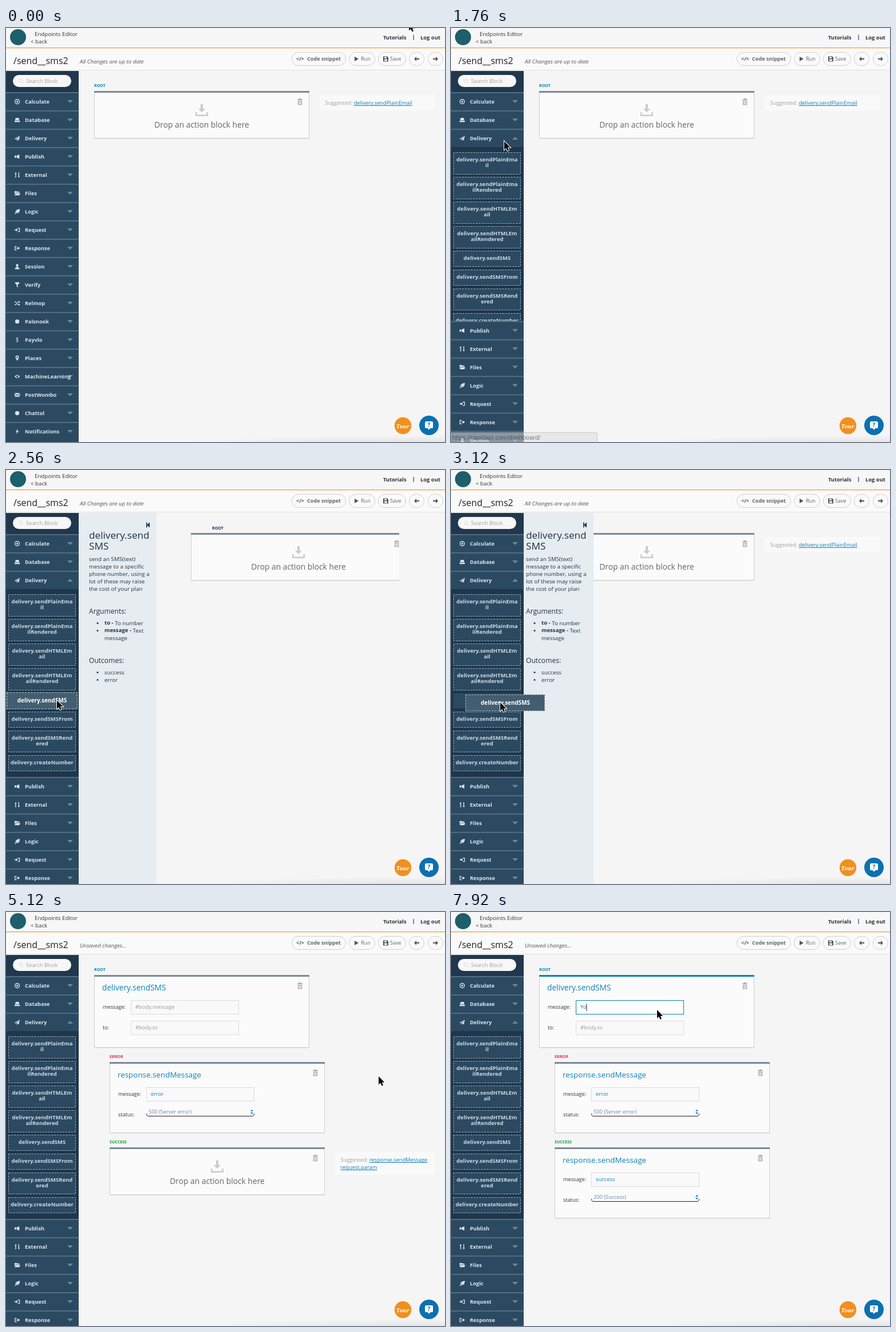
An HTML page with a canvas that plays this animation: 767 by 723 pixels, repeating every 8 s.

```html
<!DOCTYPE html>
<html lang="en">
<head>
<meta charset="utf-8">
<title>Endpoints Editor</title>
<style>
html, body { margin: 0; width: 767px; height: 723px; overflow: hidden; background: #f5f5f5; }
canvas { display: block; }
</style>
</head>
<body>
<canvas id="stage" width="767" height="723"></canvas>
<script>
const ctx = document.getElementById('stage').getContext('2d');
const LOOP = 8000, STEP = 80;
const BLUE = '#0c82b8', NAVY = '#1f3349', GREY = '#7b8996', ICON = '#dbe4ea';
const SANS = '"Open Sans", "Noto Sans", sans-serif';

// Sidebar entries: label and a 10x10 icon path
const MENU = [
  ['Calculate', 'M5 0a5 5 0 010 10a5 5 0 010-10zM5 1.5a3.5 3.5 0 000 7a3.5 3.5 0 000-7zM5 3.3a1.7 1.7 0 010 3.4a1.7 1.7 0 010-3.4z'],
  ['Database', 'M2 1h6l1 4.5H1zM0 6.3h10V9H0z'],
  ['Delivery', 'M10 0L0 6l2.5 1zM10 0L4 7.3V10l1.5-2L8 9z'],
  ['Publish', 'M0 3h3v4H0zM4 3l5-2v8L4 7z'],
  ['External', 'M2 0L0 3h1.3v7h1.4V3H4zM8 10L6 7h1.3V0h1.4v7H10z'],
  ['Files', 'M0 1h4l1 1h4v2H2L0 8zM2.5 5H11L9 9H0z'],
  ['Logic', 'M10 0Q10 9 3 8L1 10 0 9 2 7Q0 2 10 0zM7 3L3 6.5l.6.5z'],
  ['Request', 'M0 4h3V2l3.5 3L3 8V6H0zM6 1h4v8H6V7.6h2.6V2.4H6z'],
  ['Response', 'M4 1H0v8h4V7.6H1.4V2.4H4zM3.5 4h3V2L10 5 6.5 8V6h-3z'],
  ['Session', 'M5 0a2.3 2.8 0 010 5.6a2.3 2.8 0 010-5.6zM.5 10q0-3 3-4h3q3 1 3 4z'],
  ['Verify', 'M1 0h8v2L6 5v5L4 8.5V5L1 2z'],
  ['Relmop', 'M0 2h2.5l4 5H8V5.5l2.5 2.2L8 9.8V8.3H6L2 3.3H0zM0 7h2l1.2-1.2.8 1L2.5 8.3H0zM5 3.2L6 2h2V.5l2.5 2.2L8 4.8V3.3H6.5l-.7.8z'],
  ['Palsnook', 'M5 1a4 4 0 010 8a4 4 0 010-8z'],
  ['Payvlo', '$'],
  ['Places', 'M5 0a3.3 3.3 0 013.3 3.3Q8.3 5 5 10 1.7 5 1.7 3.3A3.3 3.3 0 015 0zM5 1.8a1.5 1.5 0 000 3a1.5 1.5 0 000-3z'],
  ['MachineLearning', 'M0 5Q5-1 10 5 5 11 0 5zM5 3a2 2 0 000 4a2 2 0 000-4z'],
  ['PostWombo', 'M0 1.5h10L5 5.5zM0 2.8L3 5 0 8zM10 2.8L7 5l3 3zM0 8.7l3.5-3L5 6.8l1.5-1.1 3.5 3z'],
  ['Chattol', 'M5 1a4 4 0 010 8a4 4 0 010-8z'],
  ['Notifications', 'M6 0L2 6h2.5l-1 4L8 4H5.5z']
];

// Delivery blocks: top, height, text lines
const BLOCKS = [
  [217, 39, 'delivery.sendPlainEma', 'il'],
  [260, 39, 'delivery.sendPlainEma', 'ilRendered'],
  [303, 39, 'delivery.sendHTMLEm', 'ail'],
  [346, 39, 'delivery.sendHTMLEm', 'ailRendered'],
  [389, 28, 'delivery.sendSMS'],
  [422, 28, 'delivery.sendSMSFrom'],
  [455, 38, 'delivery.sendSMSRend', 'ered'],
  [498, 28, 'delivery.createNumber']
];
const SMS = 4;

const HTML_INFO = {
  title: ['delivery.send', 'HTMLEmailR', 'endered'],
  body: ['(depreciated): use', 'sendHTMLEmail', 'instead'],
  args: [['from', 'From', 'address'], ['to', 'To address'], ['subject', 'Email', 'subject'],
    ['text', 'Email plain', 'text template'], ['html', 'Email html', 'template'],
    ['view', 'View for', 'rendering email', 'templates']],
  outcomes: [['', 'success']]
};
const SMS_INFO = {
  title: ['delivery.send', 'SMS'],
  body: ['send an SMS(text)', 'message to a specific', 'phone number, using a', 'lot of these may raise', 'the cost of your plan'],
  args: [['to', 'To number'], ['message', 'Text', 'message']],
  outcomes: [['', 'success'], ['', 'error']]
};

// Pointer path: time, x, y
const PATH = [
  [0, 704, -10], [240, 376, 236], [320, 376, 236], [560, 299, 291], [720, 299, 291],
  [1200, 94, 199], [1280, 93, 198], [1840, 93, 198], [2080, 92, 399], [2320, 92, 399],
  [2800, 86, 406], [3120, 86, 406], [3760, 293, 155], [3920, 293, 155], [4080, 597, 162],
  [4240, 597, 162], [4400, 617, 270], [4560, 617, 270], [4880, 651, 287], [5200, 651, 287],
  [5920, 646, 437], [6240, 646, 437], [7040, 360, 171], [8000, 360, 171]
];

const clamp = v => Math.max(0, Math.min(1, v));
const ease = (t, from, to) => { const p = clamp((t - from) / (to - from)); return p * p * (3 - 2 * p); };

function pointerAt(t) {
  const i = Math.max(1, PATH.findIndex(k => k[0] >= t));
  const [t0, x0, y0] = PATH[i - 1], [t1, x1, y1] = PATH[i], p = ease(t, t0, t1);
  return { x: x0 + (x1 - x0) * p, y: y0 + (y1 - y0) * p };
}

// Text is placed by its vertical middle; returns its width
function text(s, x, y, size, color, style = '', align = 'left', family = SANS) {
  ctx.font = `${style} ${size}px ${family}`;
  ctx.textAlign = align;
  ctx.fillStyle = color;
  ctx.fillText(s, x, y + size * 0.36);
  return ctx.measureText(s).width;
}

function rect(x, y, w, h, fill) {
  ctx.fillStyle = fill;
  ctx.fillRect(x, y, w, h);
}

function frame(x, y, w, h, stroke, fill, dash = []) {
  if (fill) rect(x, y, w, h, fill);
  ctx.setLineDash(dash);
  ctx.strokeStyle = stroke;
  ctx.lineWidth = 1;
  ctx.strokeRect(x + 0.5, y + 0.5, w - 1, h - 1);
  ctx.setLineDash([]);
}

function pill(x, y, w, h, fill, stroke) {
  ctx.beginPath();
  ctx.roundRect(x + 0.5, y + 0.5, w - 1, h - 1, h / 2);
  ctx.fillStyle = fill;
  ctx.fill();
  if (stroke) { ctx.strokeStyle = stroke; ctx.lineWidth = 1; ctx.stroke(); }
}

function shape(d, x, y, fill, scale = 1) {
  ctx.save();
  ctx.translate(x, y);
  ctx.scale(scale, scale);
  ctx.fillStyle = fill;
  ctx.fill(new Path2D(d));
  ctx.restore();
}

function disc(x, y, r, fill) {
  ctx.beginPath();
  ctx.arc(x, y, r, 0, 7);
  ctx.fillStyle = fill;
  ctx.fill();
}

function clipped(x, y, w, h, paint) {
  ctx.save();
  ctx.beginPath();
  ctx.rect(x, y, w, h);
  ctx.clip();
  paint();
  ctx.restore();
}

function header(t) {
  rect(0, 0, 767, 34, '#f7f7f7');
  rect(0, 34, 767, 1.5, '#f0a040');
  rect(0, 35.5, 767, 38, '#fafafa');
  rect(0, 73, 767, 1, '#e0e0e0');
  disc(21, 16, 14, '#1d5f6a');
  text('Endpoints Editor', 50, 10.5, 9.7, '#333');
  text('< back', 43, 23.5, 9.7, '#333');
  text('Tutorials', 659, 17, 9.2, '#2a2f3a', 'bold');
  rect(711.5, 12, 1.2, 9, '#27408b');
  text('Log out', 724, 17, 9.4, '#2a2f3a', 'bold');
  text('/send__sms2', 13, 57, 16, '#222');
  text(t < 3920 ? 'All Changes are up to date' : 'Unsaved changes...', 129, 58.5, 9.7, '#555', 'italic');

  for (const [x, w] of [[499, 95], [599, 46], [650, 49], [704, 27], [737, 27]]) pill(x, 42, w, 24, '#fafafa', '#cfcfcf');
  text('</>', 507, 54, 9, '#555', 'bold');
  text('Code snippet', 526, 54, 9.1, '#666', 'bold');
  shape('M0 0L7 4 0 8z', 609, 50, '#555');
  text('Run', 620, 54, 9.1, '#666');
  shape('M0 0h7l2 2v7H0zM2 1v2.5h4V1zM2 8h5V5H2z', 659, 49.5, '#555');
  text('Save', 671, 54, 9.1, '#666');
  shape('M0 4L4 0v3h5v2H4v3z', 713, 50, '#555');
  shape('M9 4L5 0v3H0v2h5v3z', 746, 50, '#555');
}

function block([y, h, ...lines], hot) {
  ctx.save();
  if (hot) {
    ctx.translate(63, y + h / 2);
    ctx.scale(1.05, 1.05);
    ctx.translate(-63, -y - h / 2);
  }
  frame(4, y, 118, h, hot ? '#c3ced6' : '#9fb0bd', hot ? '#435e71' : '#2b4a62', [3, 2]);
  lines.forEach((s, i) => text(s, 63, y + 13 + i * 10, 9.5, hot ? '#fff' : '#cfd9e0', 'bold', 'center'));
  ctx.restore();
}

function sidebar(t, hover) {
  const drop = 328 * ease(t, 1360, 1840), dragging = t >= 3120 && t < 3760;
  rect(0, 75, 127, 648, '#2b4a62');
  rect(0, 75, 127, 38, '#20374d');
  pill(11.5, 81.5, 103, 22, '#f7f7f7');
  ctx.beginPath();
  ctx.arc(26, 92, 3, 0, 7);
  ctx.moveTo(28, 94.5);
  ctx.lineTo(30.5, 97);
  ctx.lineWidth = 1;
  ctx.strokeStyle = '#ddd';
  ctx.stroke();
  text('Search Block', 35, 93, 9.4, '#a2a2a2');

  MENU.forEach(([label, icon], i) => {
    const y = 128.5 + i * 32 + (i > 2 ? drop : 0);
    const hot = !drop && hover.x < 127 && Math.abs(hover.y - y) < 16;
    const dx = hot ? 3 : 0;
    if (hot) rect(0, y - 16, 127, 32, '#435e71');
    rect(0, y - 16.5, 127, 1.6, '#5b7588');
    if (icon === '$') text('$', 19.5, y, 10, ICON, '', 'center');
    else shape(icon, 15 + dx, y - 4.5, ICON, 0.92);
    shape(i === 2 && t >= 1440 ? 'M0 5h10L5 0z' : 'M0 0h10L5 5z', 107, y - 2.5, '#6f8798');
    text(label, 33 + dx, y + 0.5, 9.25, hot ? '#fff' : ICON, 'bold');
  });

  if (drop) clipped(0, 208, 127, drop, () => {
    rect(0, 208, 127, 329, '#1f364b');
    BLOCKS.forEach((b, i) => {
      if (i === SMS && dragging) return rect(4, 390, 118, 26, '#2b4a62');
      const hot = t >= 1840 && hover.x < 127 && hover.y >= b[0] && hover.y < b[0] + b[1] + 3;
      block(b, hot);
    });
  });
}

function panel(t) {
  const slide = t < 3040 ? 1 - ease(t, 1760, 2000) : ease(t, 3040, 3440);
  if (slide >= 1) return;
  const info = t < 2160 ? HTML_INFO : SMS_INFO, left = Math.round(127 - 136 * slide), x = left + 18;
  let y = 95;
  const list = items => {
    y += 7;
    for (const [name, ...lines] of items) lines.forEach((s, i) => {
      y += 13;
      if (!i) disc(left + 33, y + 0.5, 1.5, NAVY);
      const w = !i && name ? text(name + ' - ', left + 45, y, 9.6, NAVY, 'bold') : 0;
      text(s, left + 45 + w, y, 9.75, NAVY);
    });
  };
  const heading = s => text(s, x, y += 40, 12.1, NAVY);
  clipped(127, 75, 136, 648, () => {
    rect(left, 75, 136, 648, '#e6ecef');
    shape('M0 0h1.6v4L6 0v9L1.6 5v4H0z', left + 118, 91.5, NAVY);
    info.title.forEach(s => text(s, x, y += 19, 17.2, NAVY));
    y += 9;
    info.body.forEach(s => text(s, x, y += 13, 9.75, NAVY));
    heading('Arguments:');
    list(info.args);
    heading('Outcomes:');
    list(info.outcomes);
  });
}

function cardBase(x, y, h, pointer) {
  const hot = pointer.x > x && pointer.x < x + 376 && pointer.y > y && pointer.y < y + h;
  rect(x + 1, y + h, 375, 1, '#e4e4e4');
  frame(x, y, 376, h, '#cfcfcf', '#fbfbfb');
  rect(x, y, 376, 3, hot ? BLUE : GREY);
  shape('M0 1.5h2.5V0h4v1.5H9V3H0zM.8 4h7.4v7.5H.8zM2.300 5v5.500h1V5zM4 5v5.500h1V5zM5.700 5v5.500h1V5z', x + 355, y + 13, '#aaa');
}

function dropCard(x, y, pointer) {
  cardBase(x, y, 83, pointer);
  shape('M9 0h4v8h4l-6 6-6-6h4zM0 14h2.5v4.5h17V14H22v7H0z', x + 177, y + 23, '#cbcbcb');
  text('Drop an action block here', x + 188, y + 59, 13.8, '#666', '', 'center');
}

function field(x, y, value, color, focused) {
  frame(x, y, 189, 25, focused ? BLUE : '#dcdcdc', focused ? '#fff' : '#f9f9f9');
  return text(value, x + 8, y + 11.5, 9.4, color);
}

function rootCard(t, pointer) {
  cardBase(154, 110, 127, pointer);
  text('delivery.sendSMS', 168, 132, 13.7, BLUE);
  text('message:', 169, 166, 9.2, '#333');
  text('to:', 169, 202, 9.2, '#333');
  const typed = t < 7840 ? '' : t < 7920 ? 'Y' : 'Yo', focused = t >= 7200;
  const w = field(218, 154, typed || '#body.message', typed ? BLUE : '#999', focused);
  if (focused && (t < 7440 || typed)) rect(226 + (typed ? w : 0), 160, 1, 13, '#222');
  field(218, 190, '#body.to', '#999');
}

function messageCard(y, message, status, pointer) {
  cardBase(181, y, 124, pointer);
  text('response.sendMessage', 195, y + 22, 13.4, BLUE);
  text('message:', 196, y + 56, 9.2, '#333');
  field(245, y + 44, message, BLUE);
  text('status:', 196, y + 92, 9.2, '#333');
  text(status, 249, y + 87, 9.2, '#6f84aa');
  ctx.beginPath();
  ctx.moveTo(245.5, y + 90);
  ctx.quadraticCurveTo(245.5, y + 94.5, 249, y + 94.5);
  ctx.lineTo(430, y + 94.5);
  ctx.quadraticCurveTo(433.5, y + 94.5, 433.5, y + 90);
  ctx.strokeStyle = '#222';
  ctx.stroke();
  shape('M0 3h5L2.5 0zM0 5h5L2.5 8z', 427, y + 83, BLUE);
}

// Each line is a list of links, the first one led by a caption
function suggest(x, y, w, lines) {
  rect(x, y, w, 14 + 13 * lines.length, '#f9f9f9');
  lines.forEach((links, row) => {
    let at = x + 9.5;
    const mid = y + 13.5 + row * 13;
    if (!row) at += text('Suggested: ', at, mid, 9.4, '#a0a0a0');
    links.forEach((s, i) => {
      const width = text(s, at, mid, 9.3, BLUE);
      rect(at, Math.round(mid + 4), width, 1, BLUE);
      at += width;
      if (i < links.length - 1 || row < lines.length - 1) at += text(', ', at, mid, 9.3, '#a0a0a0');
    });
  });
}

function content(t, pointer) {
  const shift = t < 3120 ? ease(t, 1760, 2000) : 0;
  const label = (s, x, y, color) => text(s, x, y, 7.1, color, 'bold');
  clipped(127, 75, 622 - 62 * shift, 648, () => {
    if (t < 3920) {
      label('ROOT', 154 + 206 * shift, 100.5 + shift, shift ? NAVY : BLUE);
      dropCard(154 + Math.round(169 * shift), 110, pointer);
      if (!shift) suggest(548, 117, 202, [['delivery.sendPlainEmail']]);
      return;
    }
    label('ROOT', 154, 100.5, BLUE);
    rootCard(t, pointer);
    label('ERROR', 181, 252.5, '#e5304d');
    const errorSet = t >= 5120, y = errorSet ? 411 : 370;
    if (errorSet) messageCard(262, 'error', '500 (Server error)', pointer);
    else {
      dropCard(181, 262, pointer);
      suggest(575, 269, 175, [['response.sendMessage'], ['request.param', 'session.getSession', 'logic.if'], ['database.save', 'database.find']]);
    }
    label('SUCCESS', 181, y - 9.5, '#149a3a');
    if (t >= 6080) messageCard(y, 'success', '200 (Success)', pointer);
    else {
      dropCard(181, y, pointer);
      suggest(575, y + 8, 175, [['response.sendMessage'], ['request.param']]);
    }
  });
}

function overlays(t, pointer) {
  const shade = ctx.createRadialGradient(0, 0, 0, 0, 0, 1);
  shade.addColorStop(0, 'rgba(0,0,0,.08)');
  shade.addColorStop(1, 'rgba(0,0,0,0)');
  clipped(320, 705, 447, 18, () => {
    ctx.translate(700, 725);
    ctx.scale(380, 14);
    ctx.fillStyle = shade;
    ctx.fillRect(-1, -1, 2, 1);
  });

  disc(693.5, 694.5, 14.7, '#f0901e');
  text('Tour', 693.5, 696, 9.5, '#fff', 'italic bold', 'center', '"Noto Serif", serif');
  disc(739, 694, 17, '#0c70b0');
  shape('M2 0h10q2 0 2 2v8q0 2-2 2H9l-2 3-2-3H2q-2 0-2-2V2q0-2 2-2z', 732, 687, '#fff');
  text('?', 739, 693, 10, '#0c70b0', 'bold', 'center');

  if (t >= 1200 && t < 2240) {
    ctx.globalAlpha = 1 - 0.93 * ease(t, 1520, 2000);
    ctx.beginPath();
    ctx.roundRect(-1, 706.5, 256.5, 18, [0, 3, 0, 0]);
    ctx.fillStyle = '#dedede';
    ctx.fill();
    ctx.strokeStyle = '#a5a5a5';
    ctx.stroke();
    text('https://rapidapi.com/dashboard/', 2, 715, 11, '#222', '', 'left', '"Liberation Sans", sans-serif');
    ctx.globalAlpha = 1;
  }

  if (t >= 3120 && t < 3760) {
    const x = Math.round(pointer.x - 61), y = Math.round(pointer.y - 14);
    frame(x, y, 139, 29, '#b4c1ca', '#435e71', [3, 2]);
    text('delivery.sendSMS', x + 70, y + 14, 9.9, '#fff', 'bold', 'center');
  }

  const arrow = new Path2D('M0 0V14.5L3.3 11.5 5.6 16.5 8 15.4 5.8 10.6H10.5z');
  ctx.save();
  ctx.translate(pointer.x, pointer.y);
  ctx.lineWidth = 2;
  ctx.strokeStyle = '#fff';
  ctx.stroke(arrow);
  ctx.fillStyle = '#000';
  ctx.fill(arrow);
  ctx.restore();
}

function draw() {
  const t = Math.floor(performance.now() % LOOP / STEP) * STEP;
  const pointer = pointerAt(t);
  rect(0, 0, 767, 723, '#f5f5f5');
  content(t, pointer);
  panel(t);
  header(t);
  // Hover styling trails the pointer slightly
  sidebar(t, pointerAt(Math.max(0, t - STEP)));
  overlays(t, pointer);
  requestAnimationFrame(draw);
}
draw();
</script>
</body>
</html>
```
